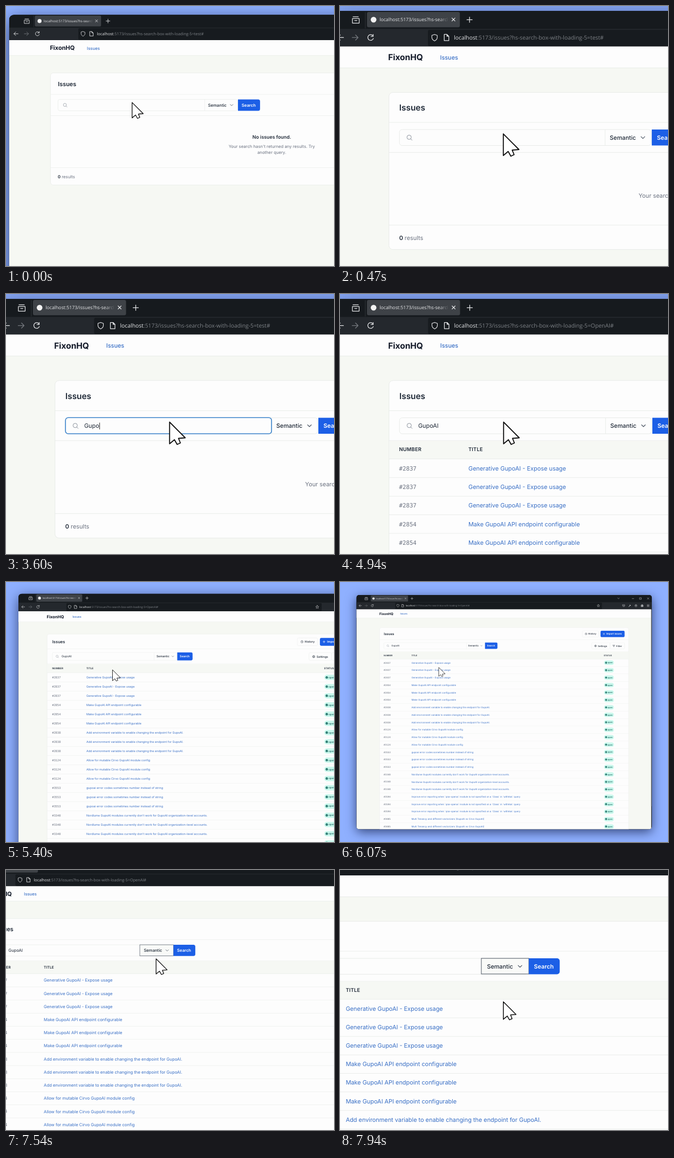
An HTML page for the animation above (8 s loop, 608 px wide and 480 px high).

```html
<!DOCTYPE html>
<html lang="en">
<head>
<meta charset="utf-8">
<title>Issue search</title>
<style>
  html, body { margin: 0; width: 100%; height: 100%; overflow: hidden; background: #8fb0ff; }
  svg { display: block; width: 608px; height: 480px; }
  text { font-family: Inter, sans-serif; text-rendering: geometricPrecision; white-space: pre; }
  .ui { font-family: "Open Sans", sans-serif; }
  .mono { font-family: "DejaVu Sans Mono", monospace; }
  .shadow { filter: drop-shadow(0 5px 10px rgba(10, 20, 60, .68)); }
</style>
</head>
<body>
<svg id="stage" viewBox="0 0 608 480"></svg>
<script>
const LOOP = 8000, ROW = 13.74, TOP = 142.2;
const QUERY = 'GupoAI';
const LINK = '#3a70c6', INK = '#1f2937', GRAY = '#6b7280', LINE = '#e8ebe8', PAPER = '#fdfdfd', BLUE = '#1c5fe6';

const text = (x, y, size, str, fill = INK, weight = 400, extra = '') =>
  `<text x="${x}" y="${y + size * .36}" font-size="${size}" fill="${fill}" font-weight="${weight}" ${extra}>${str}</text>`;
const rect = (x, y, w, h, fill, extra = '') =>
  `<rect x="${x}" y="${y}" width="${w}" height="${h}" fill="${fill}" ${extra}/>`;
const path = (d, stroke, w = .5, fill = 'none') =>
  `<path d="${d}" stroke="${stroke}" stroke-width="${w}" fill="${fill}" stroke-linecap="round" stroke-linejoin="round"/>`;
const ring = (x, y, r, stroke, w = .5) =>
  `<circle cx="${x}" cy="${y}" r="${r}" fill="none" stroke="${stroke}" stroke-width="${w}"/>`;
const rule = y => rect(73.5, y - .15, 461.5, .35, LINE);

// Each issue is listed three times, the last one once.
const issues = [
  [2837, `Generative ${QUERY} - Expose usage`],
  [2854, `Make ${QUERY} API endpoint configurable`],
  [2838, `Add environment variable to enable changing the endpoint for ${QUERY}.`],
  [3124, `Allow for mutable Cirvo ${QUERY} module config`],
  [3553, 'gupoai error codes sometimes number instead of string'],
  [3340, `Nordlume ${QUERY} modules currently don't work for ${QUERY} organization-level accounts.`],
  [3594, 'Improve error reporting when `qna-openai` module is not specified on a `Class` in `withAsk` query'],
  [3085, `Multi Tenancy and different vectorizers (${QUERY} vs Cirvo ${QUERY})`],
  [2575, 'text2vec-openai organization header']
];

function row(i) {
  const [num, title] = issues[Math.floor(i / 3)];
  const y = TOP + ROW * (i + .5);
  return text(81, y, 4.3, '#' + num, GRAY, 400, 'class="mono"') +
    text(132.4, y, 4.39, title, LINK) +
    rect(489.5, y - 4, 18, 8, '#c9f7ec', 'rx="4"') +
    `<circle cx="493.2" cy="${y}" r="1.8" fill="#14675f"/>` +
    path(`M492.4 ${y}l.6 .7 1-1.3`, '#c9f7ec', .4) +
    text(496, y, 3.73, 'open', '#115e59', 500) + rule(TOP + ROW * (i + 1));
}

const card = bottom =>
  rect(73.5, 84.3, 461.5, bottom - 84.3, PAPER, `rx="3" stroke="${LINE}" stroke-width=".4"`) +
  rule(106.5) + rule(128.7);

function footer(y, count) {
  return rule(y) + text(81.1, y + 9.4, 4.35,
    `<tspan font-weight="600" fill="${INK}">${count}</tspan> results`, GRAY);
}

function emptyList() {
  const mid = 'text-anchor="middle"';
  return card(200.6) + text(304, 150.8, 4.96, 'No issues found.', INK, 600, mid) +
    text(304, 160.7, 4.35, "Your search hasn't returned any results. Try", GRAY, 400, mid) +
    text(304, 166.9, 4.35, 'another query.', GRAY, 400, mid) + footer(182.5, 0);
}

function fullList() {
  const head = (x, s) => text(x, 135.2, 3.73, s, INK, 600, 'letter-spacing=".08"');
  let out = card(503.7) + rect(73.7, 128.9, 461, 13.3, '#f6f8f4') +
    head(81, 'NUMBER') + head(132.4, 'TITLE') + head(489, 'STATUS') + rule(TOP) +
    rect(73.7, TOP + 4 * ROW, 461, ROW, '#f4f6f2', 'id="hover"');
  for (let i = 0; i < 25; i++) out += row(i);
  return out + footer(485.7, 25);
}

function toolbar() {
  const box = `rx="2" stroke="${LINE}" stroke-width=".4"`;
  return text(81.2, 95.6, 6.15, 'Issues', INK, 600) +
    rect(449, 90, 30.5, 11.6, PAPER, box) + ring(456, 95.8, 1.7, INK, .4) + path('M456 94.8v1.1l.7.4', INK, .4) +
    text(460, 95.8, 4.35, 'History', INK, 500) +
    rect(482.9, 90, 44.6, 11.8, BLUE, 'rx="2"') + path('M487.5 95.8h3.2M489.1 94.2v3.2', '#fff') +
    text(493.8, 95.8, 4.35, 'Import issues', '#fff', 600) +
    rect(466.5, 112, 34, 11.6, PAPER, box) + ring(473.6, 118, 1.6, INK, .6) + ring(473.6, 118, .5, INK, .4) +
    text(478, 118, 4.35, 'Settings', INK, 500) +
    rect(500.5, 112, 27, 11.6, PAPER, box) + path('M505.5 116.7h4M506.3 118h2.4M507 119.3h1', INK) +
    text(512, 118, 4.35, 'Filter', INK, 500) +
    rect(81.3, 111.8, 187, 11.8, PAPER, box) + rect(233.9, 111.8, .35, 11.8, LINE) +
    rect(81.3, 111.7, 152.8, 11.9, 'none', 'id="focus" rx="2" stroke="#3d84cb" stroke-width=".65"') +
    ring(88.5, 117.5, 1.6, '#8b929c', .4) + path('M89.7 118.7l1 1', '#8b929c', .4) +
    text(95.2, 117.8, 4.35, '', INK, 400, 'id="query"') + rect(95, 115.4, .35, 5, '#111', 'id="caret"') +
    rect(233.4, 111.8, 35.4, 11.6, '#f9faf8', 'id="picked" stroke="#4b5563" stroke-width=".4"') +
    text(237.6, 117.7, 4.35, 'Semantic', INK, 500) + path('M260.8 117l1.4 1.4 1.4-1.4', '#4b5563', .45) +
    `<path d="M268.8 111.8h21a2 2 0 0 1 2 2v7.8a2 2 0 0 1-2 2h-21z" fill="${BLUE}"/>` +
    text(272.6, 117.7, 4.35, 'Search', '#fff', 600);
}

function browser() {
  const c = '#e6e7e9';
  return rect(30.5, 24, 547.5, 26.2, '#161a1e') + rect(30.5, 37.3, 547.5, 12.9, '#24282d') +
    rect(102.5, 38, 383, 12, '#171b1f', 'rx="1.2"') + rect(57.2, 24.8, 69, 11.3, '#3e4247', 'rx="1.3"') +
    rect(55.8, 25, .35, 12, '#34383d') +
    path('M46.8 28.3h4M46.4 29.6h5v3.4h-5zM48 31.1h1.8', c) +
    '<circle cx="62.1" cy="30.5" r="2.1" fill="#f2f2f2"/>' +
    text(66.5, 30.5, 3.5, 'localhost:5173/issues?hs-searcl', c, 400, 'class="ui"') +
    rect(110.5, 27, 8.5, 7, 'url(#fade)') + path('M120.3 29.2l2.3 2.3M122.6 29.2l-2.3 2.3', c, .45) +
    path('M131.4 30.5h4M133.4 28.5v4', c) +
    path('M35.4 43.7h4.4M37.3 41.8l-1.9 1.9 1.9 1.9', c) +
    path('M46.2 43.7h4.4M48.7 41.8l1.9 1.9-1.9 1.9', '#74787d') +
    path('M61.5 42.3a2.1 2.1 0 1 0 .4 2.1M61.8 41.4v1.5h-1.6', c) +
    path('M107.4 41.4l2 .7v1.5c0 1.2-.8 2-2 2.6-1.2-.6-2-1.4-2-2.6v-1.5z', c, .45) +
    path('M114.6 41.4h2l1.4 1.4v3.2h-3.4zM116.6 41.4v1.4h1.4', c) +
    text(121.8, 43.9, 4.15,
      `<tspan fill="${c}">localhost</tspan>:5173/issues?hs-search-box-with-loading-5=<tspan id="tail"></tspan>#`,
      '#7d8186', 400, 'class="ui"') +
    path('M478.9 41.4l.7 1.6 1.7.1-1.3 1.1.4 1.7-1.5-.9-1.5.9.4-1.7-1.3-1.1 1.7-.1z', c, .4) +
    path('M514.6 29.5l1.6 1.5 1.6-1.5M541.4 30.7h3.2M555.5 29h3v3h-3zM569.6 29l3 3M572.6 29l-3 3', c, .45) +
    path('M523.8 42h4v1.6a2 2 0 0 1-4 0zM524.9 43.2l.9.9.9-.9', c, .45) +
    path('M535.5 45.4l2-2M537.2 42.2l1.5 1.5', c, .9) + ring(548.5, 43.7, 2, c, .45) +
    '<circle cx="548.5" cy="43.3" r=".8" fill="#e6e7e9"/>' +
    path('M558.4 42.6h1.2v-.8h1v.8h1.2v3h-3.4z', c, .5, '#9a9da1') + path('M569.3 42.2h3.6M569.3 43.7h3.6M569.3 45.2h3.6', c);
}

const stage = document.getElementById('stage');
stage.innerHTML = `
  <defs>
    <clipPath id="win"><rect x="30.5" y="24" width="547.5" height="432.5" rx="5"/></clipPath>
    <clipPath id="view"><rect x="30.5" y="50.1" width="547.5" height="406.4"/></clipPath>
    <linearGradient id="fade"><stop stop-color="#3e4247" stop-opacity="0"/><stop offset=".9" stop-color="#3e4247"/></linearGradient>
  </defs>
  <rect width="608" height="480" fill="#8fb0ff"/>
  <g id="world">
    ${rect(30.5, 24, 547.5, 432.5, '#171b1f', 'rx="5" class="shadow"')}
    <g clip-path="url(#win)">
      <g clip-path="url(#view)">
        ${rect(30, 50, 549, 407, '#f6f8f3')}
        <g id="page">
          ${rect(30, 50, 549, 16, PAPER)}${rect(30, 66, 549, .35, LINE)}
          ${text(72.9, 58.4, 6.2, 'FixonHQ', '#111827', 700)}${text(111.5, 58.6, 4.35, 'Issues', LINK, 500)}
          <g id="empty">${emptyList()}</g><g id="full">${fullList()}</g>${toolbar()}
        </g>
        ${rect(576.8, 50, 1.2, 407, '#26292e')}${rect(576.8, 51, 1.2, 363, '#4b4f54', 'id="bar"')}
      </g>
      ${browser()}
    </g>
    <g id="pointer">${path('M0 0V16L3.6 13 5.6 16.5 8 15.4 6.6 12 11.6 11.6Z', '#111', .75, '#fff')}</g>
  </g>`;

const el = id => document.getElementById(id);
const show = (id, on) => { el(id).style.display = on ? '' : 'none'; };
const move = (id, v) => el(id).setAttribute('transform', v);

const spring = ms => {
  const k = Math.max(0, ms) * .013;
  return 1 - (1 + k) * Math.exp(-k);
};
const ease = (t, a, b) => {
  const k = Math.min(1, Math.max(0, (t - a) / (b - a)));
  return k * k * (3 - 2 * k);
};
const press = (t, at) => .38 * Math.max(0, 1 - Math.abs(t - at) / 150);

const keys = [2270, 2670, 3270, 3600, 3740, 4200];
const SUBMIT = 4740;
const stops = [[5050, 5720, 183, 158], [6340, 6900, 251, 116], [7300, 7880, 249.8, 144]];

function draw(t) {
  const first = spring(t + 133) - spring(t - 5146), second = spring(t - 7410);
  const s = 1 + 1.5 * (first + second);
  const tx = -93 * first - 321.3 * second, ty = -51 * first - 116 * second;
  move('world', `translate(${tx} ${ty}) scale(${s})`);

  let x = 158.5, y = 115;
  for (const [a, b, px, py] of stops) {
    const k = ease(t, a, b);
    x += (px - x) * k;
    y += (py - y) * k;
  }
  const size = 1 - press(t, 1070) - press(t, 7000) - press(t, 8018);
  move('pointer', `translate(${x} ${y}) scale(${size})`);

  const scroll = 48.6 * (ease(t, 6380, 6750) - ease(t, 7130, 7400));
  move('page', `translate(0 ${-scroll})`);
  move('bar', `translate(0 ${scroll * .89})`);

  const done = t >= SUBMIT;
  show('empty', !done);
  show('full', done);
  show('hover', t > 6700 && t < 7150);
  show('focus', t > 1100 && !done);
  show('caret', t > 1400 && !done);
  show('picked', t > 7270);
  el('tail').textContent = done ? 'OpenAI' : 'test';

  const typed = QUERY.slice(0, keys.filter(k => t >= k).length);
  if (el('query').textContent !== typed) el('query').textContent = typed;
  el('caret').setAttribute('x', 95.4 + (typed ? el('query').getComputedTextLength() : 0));
}

function tick() {
  draw(performance.now() % LOOP);
  requestAnimationFrame(tick);
}
tick();
</script>
</body>
</html>
```
